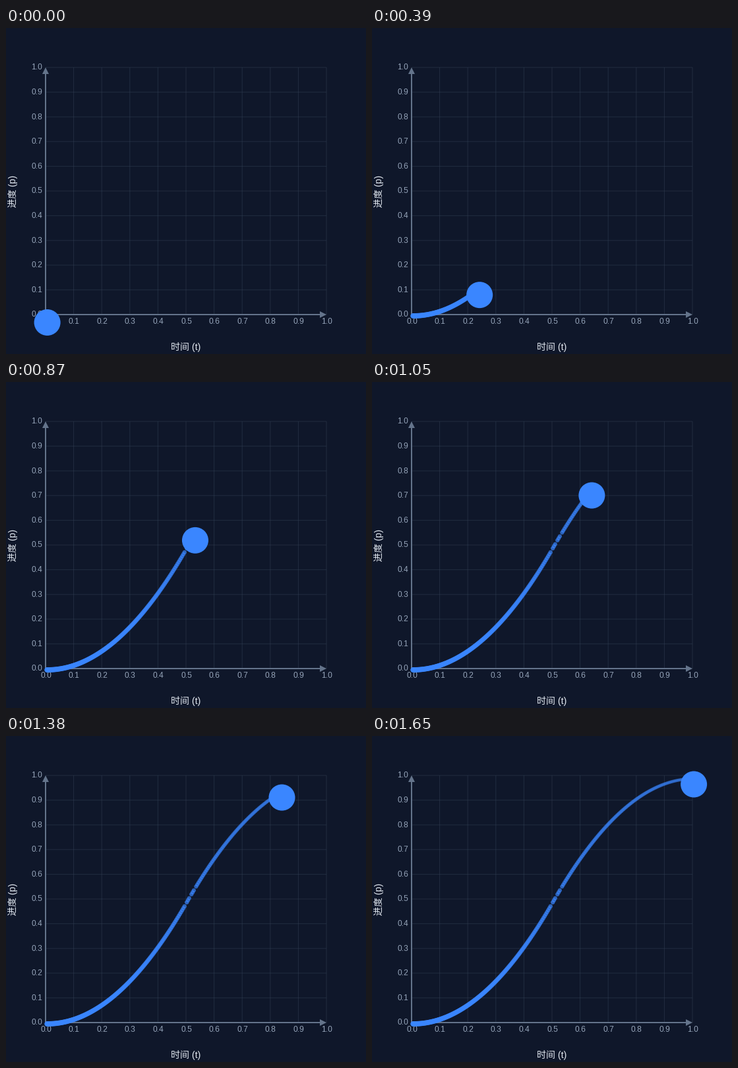
A matplotlib script that plays this animation: 546 by 496 pixels, repeating every 1.68 s.

```python
import numpy as np
import matplotlib.pyplot as plt
from matplotlib.animation import FuncAnimation
from matplotlib.patches import Circle, Polygon

W, H, DPI = 546, 496, 100
PX = 72 / DPI                       # points per pixel
FRAMES, INTERVAL = 56, 30
LEFT, RIGHT, TOP, BOTTOM = 60, 486, 60, 436
BG, GRID, AXIS = "#0f172a", "#334155", "#64748b"
TICK, TITLE, BLUE = "#94a3b8", "#e2e8f0", "#3a86ff"

plt.rcParams["font.family"] = ["Liberation Sans", "Noto Sans CJK JP"]

fig = plt.figure(figsize=(W / DPI, H / DPI), dpi=DPI, facecolor=BG)
ax = fig.add_axes([0, 0, 1, 1])
ax.set_xlim(0, W)
ax.set_ylim(H, 0)
ax.axis("off")


def ease(t):
    """Quadratic ease in and out."""
    return np.where(t < 0.5, 2 * t * t, 1 - 2 * (1 - t) ** 2)


def line(x0, y0, x1, y1, color, width, alpha=1, z=1):
    ax.plot([x0, x1], [y0, y1], color=color, lw=width * PX, alpha=alpha,
            solid_capstyle="butt", snap=False, zorder=z)


def label(x, y, text, size, color, ha="center", va="baseline", **kw):
    ax.text(x, y, text, fontsize=size * PX, color=color, ha=ha, va=va,
            zorder=3, **kw)


def draw_chart():
    for k in range(11):
        x = LEFT + (RIGHT - LEFT) * k / 10
        y = BOTTOM - (BOTTOM - TOP) * k / 10
        line(x, TOP, x, BOTTOM, GRID, 1, 0.5)
        line(LEFT, y, RIGHT, y, GRID, 1, 0.5)
        label(x + 0.5, 450.4, f"{k / 10:.1f}", 12, TICK)
        label(55.4, y + 3.4, f"{k / 10:.1f}", 12, TICK, ha="right")

    line(LEFT, BOTTOM, RIGHT - 5, BOTTOM, AXIS, 2, z=2)
    line(LEFT, BOTTOM, LEFT, TOP + 5, AXIS, 2, z=2)
    heads = ([(LEFT, TOP), (LEFT - 5, TOP + 10), (LEFT + 5, TOP + 10)],
             [(RIGHT, BOTTOM), (RIGHT - 10, BOTTOM - 5),
              (RIGHT - 10, BOTTOM + 5)])
    for pts in heads:
        ax.add_patch(Polygon(pts, fc=AXIS, lw=0, zorder=2))

    label(273, 490, "时间 (t)", 14, TITLE)
    label(10, 248, "进度 (p)", 14, TITLE, va="center", rotation=90)


draw_chart()

# Trail: shrinking, fading dots; a few are skipped near the steepest part
DOTS = 242
dot_t = np.delete(np.arange(DOTS) / (DOTS - 1), [119, 123, 127])
dot_xy = np.column_stack([62.3 + 425.6 * dot_t, 438 - 373 * ease(dot_t)])
dot_size = (8 * (1 - 0.4 * dot_t) * PX) ** 2
trail = ax.scatter(*dot_xy.T, s=dot_size, c=BLUE, alpha=1 - 0.6 * dot_t,
                   linewidths=0, zorder=4)
ball = ax.add_patch(Circle((0, 0), 20, fc=BLUE, lw=0, zorder=5))


def update(i):
    t = i / (FRAMES - 1)
    ball.center = (62.6 + 425.5 * t, 448 - 374.5 * float(ease(t)))
    trail.set_offsets(dot_xy[dot_t <= t])
    return trail, ball


def init():
    return update(0)


anim = FuncAnimation(fig, update, frames=FRAMES, init_func=init,
                     interval=INTERVAL, repeat=True, repeat_delay=0)
plt.show()
```
